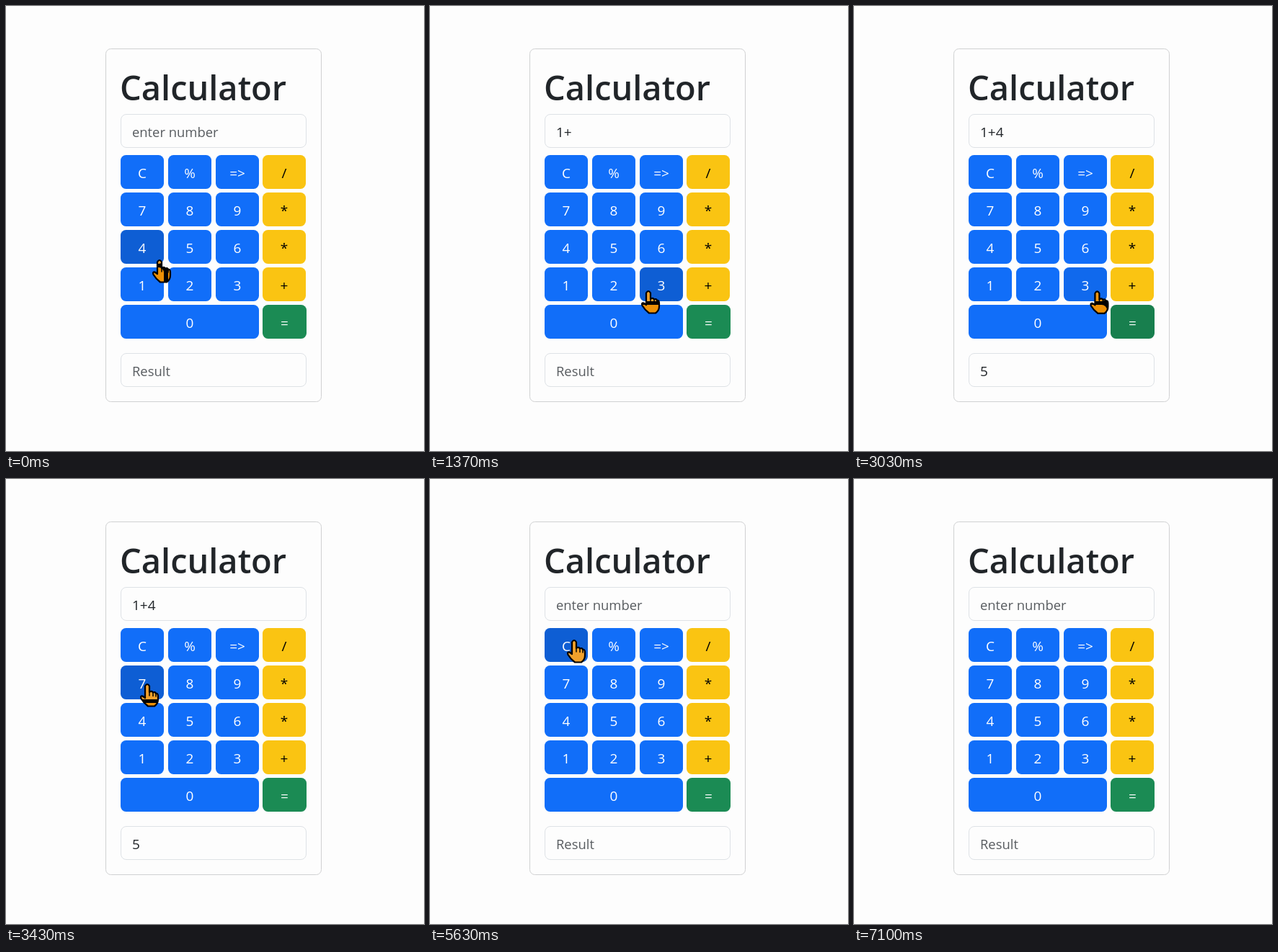
Animation, 580 px wide and 618 px high, one loop 7.13 s. Source, as an HTML page:

```html
<!DOCTYPE html>
<html lang="en">
<head>
<meta charset="utf-8">
<title>Calculator</title>
<style>
  html, body { margin: 0; width: 100%; height: 100%; overflow: hidden; background: #fdfdfd; }
  svg { display: block; isolation: isolate; font: 19px "Open Sans", "Noto Sans", sans-serif; }
  .page { fill: #fdfdfd; }
  .card, .field { fill: none; stroke: #d0d1d2; }
  .field { stroke: #dee2e6; }
  .title { font-size: 47px; font-weight: 600; }
  .title, .value { fill: #212529; }
  .hint { font-size: 18.4px; fill: #585c60; }
  .label { text-anchor: middle; }
  .invert { fill: #fff; mix-blend-mode: difference; }
  .outline { fill: none; stroke: #000; stroke-width: 2.2; stroke-linejoin: round; stroke-linecap: round; }
  .creases { stroke-width: 1.5; }
</style>
</head>
<body>
<svg width="580" height="618" viewBox="0 0 580 618">
  <defs>
    <path id="hand" d="M-3 2.5Q0-2.5 3 2.5V11Q6 8.5 8 11.5Q11 10 12 13Q15 12.5 15 16.5V21Q15 27 10 30.5H1Q-5 26 -8.5 20Q-10 16 -6.5 16.5L-3 19Z"/>
  </defs>
  <rect class="page" width="580" height="618"/>
  <rect class="card" x="138.5" y="59.5" width="299" height="490" rx="7"/>
  <text class="title" x="158" y="131">Calculator</text>
  <rect class="field" x="159.5" y="150.5" width="257" height="46" rx="7.5"/>
  <rect class="field" x="159.5" y="482.5" width="257" height="46" rx="7.5"/>
  <text id="entry" x="175" y="182"></text>
  <text id="result" x="175" y="514"></text>
  <g id="keys"></g>
  <!-- the pointer inverts whatever lies beneath it -->
  <use class="hand invert" href="#hand"/>
  <g class="hand outline">
    <use href="#hand"/>
    <path class="creases" d="M3 11V16M8 12V16.5M12 13.5V17"/>
  </g>
</svg>
<script>
const LOOP = 7130, FADE = 150, SAMPLES = 6;
const byId = id => document.getElementById(id);

const themes = {
  blue: { idle: [17, 110, 249], hover: [14, 94, 212], text: '#fff' },
  yellow: { idle: [250, 196, 18], hover: [255, 202, 44], text: '#000' },
  green: { idle: [27, 139, 84], hover: [21, 115, 71], text: '#fff' }
};

// time, x, y of the fingertip
const route = [
  [0, 213, 353], [330, 195, 388], [480, 195, 388],
  [850, 384, 390], [1030, 384, 390], [1370, 303, 396],
  [1650, 194, 338], [1780, 194, 338], [2120, 380, 430],
  [2850, 380, 430], [3430, 196, 285], [3650, 194, 226],
  [4400, 194, 226], [5100, 200, 224], [6150, 200, 224],
  [6800, 212, -50], [LOOP, 212, -50]
];
const entries = [[400, '1'], [950, '1+'], [1740, '1+4'], [3850, '']];
const results = [[2550, '5'], [3850, '']];

function add(parent, tag, attrs, text) {
  const el = document.createElementNS('http://www.w3.org/2000/svg', tag);
  for (const k in attrs) el.setAttribute(k, attrs[k]);
  if (text) el.textContent = text;
  parent.append(el);
  return el;
}

const keys = [];
function addKey(label, x, y, w, name) {
  const theme = themes[name];
  const rect = add(byId('keys'), 'rect', { x, y, width: w, height: 47, rx: 7.5 });
  add(byId('keys'), 'text', { class: 'label', x: x + w / 2, y: y + 32, fill: theme.text }, label);
  keys.push({ x, y, w, theme, rect });
}

const columns = [159, 225, 291, 356];
['C % => /', '7 8 9 *', '4 5 6 *', '1 2 3 +'].forEach((row, r) =>
  row.split(' ').forEach((label, c) =>
    addKey(label, columns[c], 207 + 52 * r, 60, c === 3 ? 'yellow' : 'blue')));
addKey('0', 159, 415, 192, 'blue');
addKey('=', 356, 415, 61, 'green');

function tipAt(t) {
  const i = Math.max(1, route.findIndex(p => p[0] >= t));
  const [t0, x0, y0] = route[i - 1], [t1, x1, y1] = route[i];
  const u = (t - t0) / (t1 - t0), e = u * u * (3 - 2 * u);
  return [x0 + (x1 - x0) * e, y0 + (y1 - y0) * e];
}

const inside = (k, [x, y]) => x >= k.x && x <= k.x + k.w && y >= k.y && y <= k.y + 47;

function show(el, steps, hint, t) {
  const value = steps.reduce((v, s) => t >= s[0] ? s[1] : v, '');
  el.textContent = value || hint;
  el.setAttribute('class', value ? 'value' : 'hint');
}

const hands = document.querySelectorAll('.hand');

function draw(t) {
  // averaging recent positions gives each key its hover fade
  const trail = Array.from({ length: SAMPLES }, (_, i) => tipAt(Math.max(0, t - i * FADE / SAMPLES)));
  for (const k of keys) {
    const h = trail.filter(p => inside(k, p)).length / SAMPLES;
    const rgb = k.theme.idle.map((v, i) => Math.round(v + (k.theme.hover[i] - v) * h));
    k.rect.setAttribute('fill', `rgb(${rgb})`);
  }
  show(byId('entry'), entries, 'enter number', t);
  show(byId('result'), results, 'Result', t);
  hands.forEach(el => el.setAttribute('transform', `translate(${trail[0]})`));
}

const start = performance.now();
function tick() {
  draw((performance.now() - start) % LOOP);
  requestAnimationFrame(tick);
}
tick();
</script>
</body>
</html>
```
